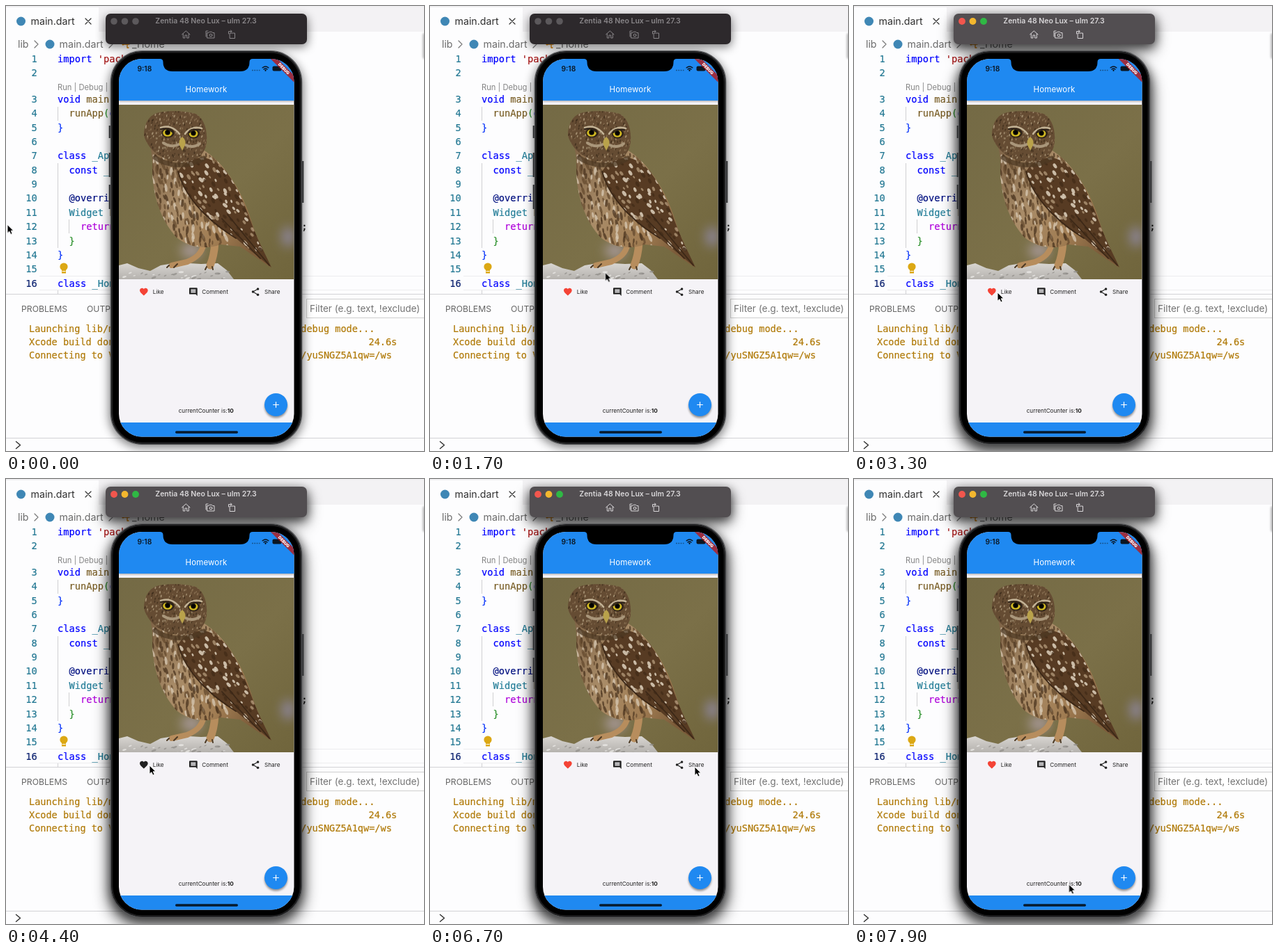
An HTML page that plays this animation: 600 px wide and 640 px high, repeating every 8 s.

```html
<!DOCTYPE html>
<html lang="en">
<head>
<meta charset="utf-8">
<title>Homework app</title>
<style>
html, body { margin: 0; width: 100%; height: 100%; overflow: hidden; background: #fdfdfe; }
svg { display: block; width: 600px; height: 640px; }
text { font-family: Inter, "Liberation Sans", sans-serif; white-space: pre; }
.mono text { font-family: "DejaVu Sans Mono", "Liberation Mono", monospace; }
.mono text, .mono tspan { fill: currentColor; stroke: currentColor; stroke-width: .2px; }
.ui { font-size: 14.2px; fill: #6a6a6a; }
.label { font-size: 8.2px; fill: #222; }
.line { fill: none; stroke: currentColor; stroke-linecap: round; stroke-linejoin: round; }
.key { color: #0000ff; } .type { color: #267f99; } .str { color: #a31515; }
.fn { color: #795e26; } .ctl { color: #af00db; } .var { color: #001080; }
.b1 { color: #0431fa; } .b2 { color: #319331; } .txt { color: #111; }
.num { color: #237893; } .now { color: #0b216f; } .log { color: #b07a08; }

#bar, #chrome, .live, #heart, #cursor { animation: 8s infinite step-end; }
#bar { fill: #2d292c; animation-name: bar; }
#chrome { color: #898689; animation-name: chrome; }
.live { opacity: 0; animation-name: live; }
#heart { fill: #f44336; animation-name: heart; }
#cursor { animation-name: move; animation-timing-function: ease-in-out; }
@keyframes bar { 0% { fill: #2d292c } 40%, 100% { fill: #524e51 } }
@keyframes chrome { 0% { color: #898689 } 40%, 100% { color: #d9d7d9 } }
@keyframes live { 0% { opacity: 0 } 40%, 100% { opacity: 1 } }
@keyframes heart { 0% { fill: #f44336 } 48.75% { fill: #212121 } 58.75%, 100% { fill: #f44336 } }
@keyframes move {
  0%, 1.25% { transform: translate(2px, 314.5px) }
  11.25%, 13.75% { transform: translate(315.5px, 330px) }
  27.5%, 32.5% { transform: translate(205px, 422px) }
  37.5%, 65% { transform: translate(206px, 412px) }
  70%, 76.25% { transform: translate(277.5px, 414.5px) }
  82.5%, 87.5% { transform: translate(380px, 414px) }
  98.75%, 100% { transform: translate(308.5px, 583px) }
}
</style>
</head>
<body>
<svg viewBox="0 0 600 640">
  <defs>
    <filter id="soft" x="-20%" y="-40%" width="140%" height="180%"><feGaussianBlur stdDeviation="7"/></filter>
    <filter id="wide" x="-30%" y="-30%" width="160%" height="160%"><feGaussianBlur stdDeviation="11"/></filter>
    <filter id="haze" x="-60%" y="-60%" width="220%" height="220%"><feGaussianBlur stdDeviation="8"/></filter>
    <filter id="tiny" x="-30%" y="-30%" width="160%" height="160%"><feGaussianBlur stdDeviation="1.6"/></filter>
    <clipPath id="screen"><rect x="162" y="76" width="251.500" height="543.500" rx="33"/></clipPath>
    <clipPath id="photo"><rect x="162" y="142" width="251.500" height="251"/></clipPath>
    <path id="headShape" d="M198 186C198 168 206 156 220 153C238 150 262 151 274 156C285 164 289 178 288 196C286 212 276 222 258 224C232 226 205 212 198 186Z"/>
    <path id="bodyShape" d="M207 200C209 212 211 222 210 238C211 268 219 304 244 332C260 347 288 351 308 343L336 346L380 376C372 356 362 338 355 318C345 282 322 232 285 208Z"/>
    <path id="wingShape" d="M247 238C262 214 291 212 310 232C332 254 344 290 356 322C364 342 374 360 381 376C364 362 346 348 330 334C302 318 266 292 247 238Z"/>
    <clipPath id="headClip"><use href="#headShape"/></clipPath>
    <clipPath id="bodyClip"><use href="#bodyShape"/></clipPath>
    <clipPath id="wingClip"><use href="#wingShape"/></clipPath>
    <linearGradient id="field" x2="1" y2="1">
      <stop offset="0" stop-color="#746a45"/><stop offset=".55" stop-color="#7b7048"/><stop offset="1" stop-color="#70653c"/>
    </linearGradient>
    <linearGradient id="breast" x2="1" y2=".6">
      <stop offset="0" stop-color="#7d6245"/><stop offset=".4" stop-color="#a98c68"/><stop offset=".75" stop-color="#a07c52"/><stop offset="1" stop-color="#7c5c3a"/>
    </linearGradient>
    <linearGradient id="stone" x2="0" y2="1"><stop stop-color="#dad7d3"/><stop offset="1" stop-color="#b5b2ae"/></linearGradient>
  </defs>

  <!-- editor -->
  <rect width="600" height="640" fill="#fdfdfe"/>
  <rect x="133" y="2" width="467" height="35" fill="#f3f2f4"/>
  <rect width="600" height="2" fill="#f0eff1"/>
  <rect x="598" y="39" width="10" height="37" rx="3" filter="url(#tiny)" opacity=".25"/>
  <g fill="#3f87b5"><circle cx="21.500" cy="22" r="6.500"/><circle cx="63" cy="55" r="6.500"/></g>
  <text x="35.500" y="27" class="ui" style="fill:#2f2f2f">main.dart</text>
  <path class="line" d="M114 18l8 8m0-8l-8 8" color="#333" stroke-width="1.200"/>
  <g class="ui">
    <text x="17" y="60">lib</text><text x="76.500" y="60">main.dart</text><text x="181" y="60">_Home</text>
  </g>
  <path class="line" d="M41 50l5 5-5 5M148 50l5 5-5 5" color="#777" stroke-width="1.200"/>
  <path class="line" d="M165 53l4-3 3 3-4 3zM170 55h4v5h2M174 55h3" color="#d67e00" stroke-width="1.300"/>
  <text x="74" y="120.500" font-size="11.200" fill="#858585">Run | Debug | Profile</text>
  <path d="M48 388.500H600M48 408.500H600" stroke="#ededef"/>
  <path d="M74.500 145v20M74.500 226v122M90.500 307v20M74.500 409v5" stroke="#d0d0d2"/>
  <g id="code" class="mono" font-size="13.700"></g>
  <g fill="#dca814"><circle cx="83" cy="375" r="5.600"/><path d="M80 379h6v5.500h-6z"/></g>
  <path d="M80.500 381.500h5" stroke="#fff"/>

  <!-- panel -->
  <rect y="414" width="600" height="226" fill="#fdfdfe"/>
  <path d="M0 414.500H600M0 621.500H600" stroke="#d2d2d5"/>
  <g font-size="12.200" fill="#666"><text x="22" y="439.500">PROBLEMS</text><text x="116" y="439.500">OUTPUT</text></g>
  <rect x="431.500" y="421.500" width="175" height="27" fill="#fff" stroke="#cecece"/>
  <text x="436" y="440" font-size="13.500" fill="#737373">Filter (e.g. text, !exclude)</text>
  <g class="mono log" font-size="13.550">
    <text x="33" y="468.500">Launching lib/main.dart</text><text x="423.300" y="468.500">debug mode...</text>
    <text x="33" y="487.500">Xcode build done.</text><text x="520.500" y="487.500">24.6s</text>
    <text x="33" y="507">Connecting to VM Service</text><text x="423.300" y="507">/yuSNGZ5A1qw=/ws</text>
  </g>
  <path class="line" d="M14.500 626.500l6 5-6 5" color="#333" stroke-width="1.500"/>

  <!-- shadows -->
  <g filter="url(#soft)" opacity=".5"><rect x="148" y="68" width="279" height="567" rx="47"/><rect x="142" y="15" width="291" height="44" rx="8"/></g>
  <g class="live"><g filter="url(#wide)" opacity=".58"><rect x="147" y="76" width="281" height="568" rx="46"/><rect x="143" y="20" width="289" height="44" rx="8"/></g></g>

  <!-- simulator bar -->
  <rect id="bar" x="143" y="11" width="289" height="44" rx="7"/>
  <g fill="#5c595c"><circle cx="155" cy="22" r="4.800"/><circle cx="170.500" cy="22" r="4.800"/><circle cx="186" cy="22" r="4.800"/></g>
  <g class="live"><circle cx="155" cy="22" r="4.900" fill="#f2564d"/><circle cx="170.500" cy="22" r="4.900" fill="#f3b72e"/><circle cx="186" cy="22" r="4.900" fill="#2fb944"/></g>
  <g id="chrome">
    <text x="287" y="25.300" text-anchor="middle" font-size="10.500" font-weight="600" fill="currentColor">Zentia 48 Neo Lux – ulm 27.3</text>
    <g class="line" stroke-width="1">
      <path d="M252.500 41l5.800-5.200 5.800 5.200M254.300 40v6h2.600v-4h2.800v4h2.600v-6"/>
      <path d="M289 38.500h2l1-1.300h3.500l1 1.300h2.500v7.500H289zM287 44v-8h3"/><circle cx="294" cy="42" r="1.900"/>
      <path d="M321.500 39h7v7.500h-7zM319.500 40v-3.500h4.500M322.500 35l1.700 1.500-1.700 1.500"/>
    </g>
  </g>

  <!-- phone -->
  <path d="M149 172v18M149 211v35M149 257v35M426 223v60" stroke="#2e2f31" stroke-width="2.600"/>
  <rect x="150.500" y="64.700" width="274" height="565.500" rx="45" fill="#000" stroke="#555658" stroke-width="1.600"/>
  <rect x="152.300" y="66.500" width="270.400" height="562" rx="43" fill="none" stroke="#1f1f20" stroke-width="2"/>
  <g clip-path="url(#screen)">
    <rect x="162" y="76" width="252" height="544" fill="#f5f3f7"/>
    <rect x="162" y="80" width="252" height="57" filter="url(#tiny)" opacity=".35"/>
    <rect x="162" y="76" width="252" height="60" fill="#1f89f1"/>
    <rect x="162" y="599" width="252" height="21" fill="#1f89f1"/>
    <path d="M221 76q4.500 0 4.500 4.500q0 13.500 13.500 13.500h97q13.500 0 13.500-13.500q0-4.500 4.500-4.500z"/>

    <g clip-path="url(#photo)">
      <rect x="162" y="142" width="252" height="251" fill="url(#field)"/>
      <g filter="url(#haze)">
        <ellipse cx="405" cy="332" rx="9" ry="14" fill="#8d869c"/>
        <ellipse cx="266" cy="352" rx="15" ry="11" fill="#a79998"/>
      </g>
      <path d="M162 373L174 370L190 377L207 381L222 373L246 369L280 371L304 370L317 380L327 393H162Z" fill="url(#stone)"/>
      <g id="rock"></g>
      <g class="line" color="#b78d5d"><path d="M284 342C281 355 274 362 260 368L238 373" stroke-width="8"/><path d="M300 340C299 354 297 364 293 373" stroke-width="11"/></g>
      <path class="line" d="M234 373l-3 3M246 371l-5 5M288 375l-2 4M296 375l1 4" color="#4b3924" stroke-width="2"/>
      <use href="#bodyShape" fill="url(#breast)"/>
      <g id="breastMarks" clip-path="url(#bodyClip)"></g>
      <use href="#wingShape" fill="#573b23"/>
      <g id="wingMarks" clip-path="url(#wingClip)"></g>
      <path class="line" d="M247 238C258 278 292 310 330 334M318 300L378 373M310 306L365 363" color="#3c2817" stroke-width="1.800"/>
      <path class="line" d="M214 218C232 231 262 233 284 219" color="#4c3823" stroke-width="7" opacity=".7"/>
      <use href="#headShape" fill="#654c33"/>
      <g id="headMarks" clip-path="url(#headClip)"></g>
      <path class="line" d="M222 175C232 171 242 175 249 184M281 176C272 173 262 176 257 184" color="#c3b396" stroke-width="2.600"/>
      <path class="line" d="M226 197C234 202 242 202 248 199M278 198C272 203 264 203 258 200" color="#a9967a" stroke-width="4"/>
      <g fill="#2f2318"><ellipse cx="232.500" cy="182.500" rx="9" ry="7"/><ellipse cx="269.500" cy="183.500" rx="8.500" ry="7"/></g>
      <g fill="#d0b822"><ellipse cx="232" cy="182.500" rx="6.800" ry="5.200"/><ellipse cx="269" cy="183.500" rx="6.400" ry="5.200"/></g>
      <circle cx="232" cy="181.800" r="3.700"/><circle cx="269" cy="182.800" r="3.600"/>
      <path class="line" d="M222 177q10-2 18 5M279 178q-9-1-16 4" color="#2b2118" stroke-width="2"/>
      <path d="M253 188q6 5 4 12l-4 8-4-8q-2-7 4-12z" fill="#b9a24b"/>
    </g>

    <text x="287.500" y="123.700" text-anchor="middle" font-size="11.500" letter-spacing=".12" fill="#fff">Homework</text>
    <text x="188.500" y="93.800" font-size="10.300" font-weight="600" fill="#0b1622">9:18</text>
    <path d="M353 92.500h11.500" stroke="#174f84" stroke-width="1.600" stroke-dasharray="1.800 1.500"/>
    <path class="line" d="M368.200 88.800q4.300-3.700 8.600 0M370 91q2.500-2 5 0" color="#0b1622" stroke-width="1.500"/><circle cx="372.500" cy="92.700" r="1.100"/>
    <rect x="382.500" y="86.500" width="13" height="7" rx="2" fill="#0b1622"/>
    <g transform="translate(413 76) rotate(45)">
      <rect x="-24" y="16.400" width="48" height="7.100" fill="#b71c1c" opacity=".82"/>
      <text y="22.100" text-anchor="middle" font-size="5.900" font-weight="900" fill="#fff">DEBUG</text>
    </g>

    <g transform="translate(190.800 404) scale(.586)">
      <path id="heart" d="M12 21.350l-1.450-1.320C5.400 15.360 2 12.280 2 8.500 2 5.420 4.420 3 7.500 3c1.740 0 3.410.81 4.500 2.090C13.090 3.810 14.760 3 16.500 3 19.580 3 22 5.420 22 8.500c0 3.780-3.400 6.860-8.550 11.540z"/>
    </g>
    <g transform="translate(261.800 404) scale(.586)">
      <path fill="#212121" d="M22 4a2 2 0 0 0-2-2H4a2 2 0 0 0-2 2v12a2 2 0 0 0 2 2h14l4 4z"/>
      <path d="M6 7h12M6 10h12M6 13h12" stroke="#f5f3f7" stroke-width="2"/>
    </g>
    <g transform="translate(351 404) scale(.586)" fill="#212121">
      <path class="line" d="M18 5L6 12l12 7" color="#212121" stroke-width="2"/>
      <circle cx="18" cy="5" r="3"/><circle cx="6" cy="12" r="3"/><circle cx="18" cy="19" r="3"/>
    </g>
    <g class="label">
      <text x="210.800" y="413.700">Like</text><text x="281.300" y="413.700">Comment</text><text x="371" y="413.700">Share</text>
      <text x="287.200" y="585.200" text-anchor="middle">currentCounter is:<tspan font-weight="700">10</tspan></text>
    </g>
    <circle cx="387.500" cy="576" r="16.500" filter="url(#tiny)" opacity=".4"/>
    <circle cx="387.500" cy="573.500" r="16.500" fill="#1f89f1"/>
    <path d="M383.200 573.500h8.600M387.500 569.200v8.600" stroke="#fff" stroke-width="1.200"/>
    <rect x="243" y="611.300" width="90" height="3.400" rx="1.700" fill="#071a2d"/>
  </g>

  <g id="cursor"><path d="M0 0V12.200L2.900 9.700L4.900 14L7.100 13L5.200 8.800H9Z" fill="#000" stroke="#fff" stroke-width=".9" stroke-linejoin="round"/></g>
</svg>
<script>
const $ = id => document.getElementById(id);

function add(parent, tag, attrs, text) {
  const el = document.createElementNS('http://www.w3.org/2000/svg', tag);
  for (const k in attrs) el.setAttribute(k, attrs[k]);
  if (text) el.textContent = text;
  parent.appendChild(el);
  return el;
}

// line number: [indent, class, text, class, text, ...]
const code = {
  1: [0, 'key', 'import ', 'str', "'package:flutter/material.dart'", 'txt', ';'],
  3: [0, 'key', 'void ', 'fn', 'main', 'b1', '() {'],
  4: [2, 'fn', 'runApp', 'b2', '(', 'key', 'const ', 'type', '_App', 'b2', '());'],
  5: [0, 'b1', '}'],
  7: [0, 'key', 'class ', 'type', '_App ', 'key', 'extends ', 'type', 'StatelessWidget ', 'b1', '{'],
  8: [2, 'key', 'const ', 'type', '_App', 'b2', '({Key? key});'],
  10: [2, 'var', '@override'],
  11: [2, 'type', 'Widget ', 'fn', 'build', 'b2', '(BuildContext context) {'],
  12: [4, 'ctl', 'return ', 'key', 'const ', 'type', 'MaterialApp'],
  13: [2, 'b2', '}'],
  14: [0, 'b1', '}'],
  16: [0, 'key', 'class ', 'type', '_Home ', 'key', 'extends ', 'type', 'StatefulWidget ', 'b1', '{']
};
const baseline = n => (n < 3 ? 81 + (n - 1) * 20.35 : 139 + (n - 3) * 20.35);

for (let n = 1; n <= 16; n++) {
  const y = baseline(n);
  add($('code'), 'text', { x: 44.8, y, 'text-anchor': 'end', class: n === 16 ? 'now' : 'num' }, String(n));
  if (!code[n]) continue;
  const [indent, ...parts] = code[n];
  const row = add($('code'), 'text', { x: 74 + indent * 8.25, y });
  for (let i = 0; i < parts.length; i += 2) add(row, 'tspan', { class: parts[i] }, parts[i + 1]);
}
add($('code'), 'text', { x: 424.3, y: baseline(12), class: 'txt' }, ';');

let seed = 7;
const rnd = () => (seed = (seed * 16807) % 2147483647) / 2147483647;

// scatter jittered oval marks over a box
function marks(id, [x, y, w, h], step, [rx, ry], angle, colors, opacity) {
  for (let v = y; v < y + h; v += step)
    for (let u = x; u < x + w; u += step) {
      const cx = u + rnd() * step, cy = v + rnd() * step, s = 0.6 + rnd() * 0.7;
      add($(id), 'ellipse', {
        cx, cy, rx: rx * s, ry: ry * s, opacity,
        fill: colors[Math.floor(rnd() * colors.length)],
        transform: `rotate(${angle + rnd() * 30 - 15} ${cx} ${cy})`
      });
    }
}
marks('headMarks', [196, 150, 94, 76], 5, [0.8, 1.7], 15, ['#b7a484', '#8f7657', '#3d2c1b'], 0.75);
marks('breastMarks', [206, 212, 110, 140], 7.5, [1.8, 5], -8, ['#4b351f', '#654a2e', '#d8cab4'], 0.75);
marks('wingMarks', [246, 214, 118, 136], 9, [1.9, 3.4], -35, ['#dfd2be', '#a98f70', '#452d19'], 0.85);
marks('rock', [168, 382, 150, 14], 8, [3, 1.2], -15, ['#8d8a86', '#f0eeeb'], 0.7);
</script>
</body>
</html>
```
